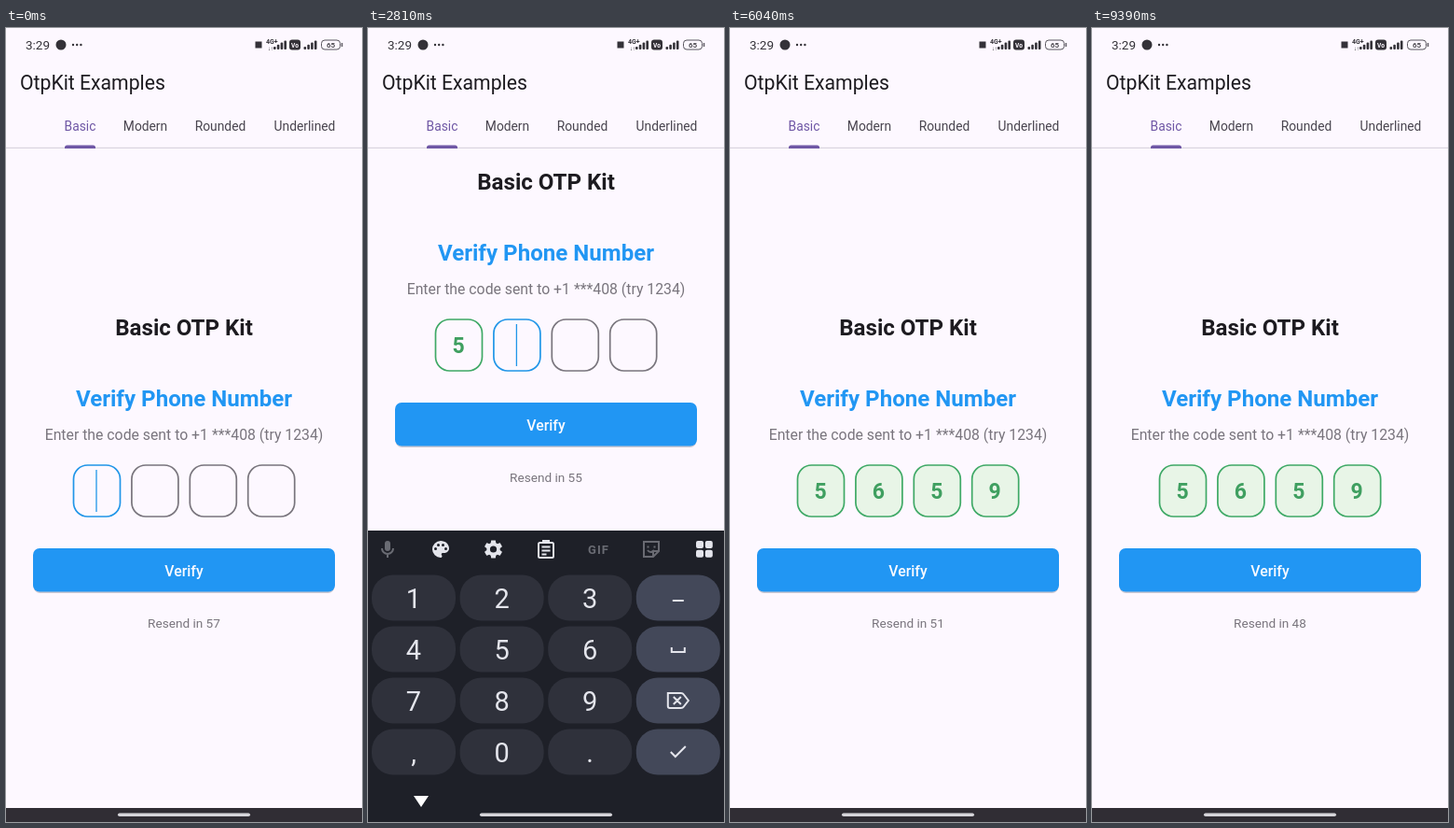
An HTML page for the animation above (9.43 s loop, 382 by 850 pixels).

```html
<!DOCTYPE html>
<html lang="en">
<head>
<meta charset="utf-8">
<title>OTP demo</title>
<style>
html, body { margin: 0; width: 100%; height: 100%; overflow: hidden; background: #fdf8ff; }
svg { display: block; width: 382px; height: 850px; font-family: Roboto, "Noto Sans", sans-serif; }
.mid { text-anchor: middle; }
.line { fill: none; stroke: #e4e5ec; stroke-width: 2; }
.tab { font-size: 13.8px; fill: #49454f; }
.head { font-size: 24.1px; font-weight: 600; }
.digit { font-size: 23px; font-weight: 600; }
.key { font-size: 29px; fill: #e4e5ec; }
.dim { opacity: .38; }
</style>
</head>
<body>
<svg viewBox="0 0 382 850">
  <rect width="382" height="850" fill="#fdf8ff"/>

  <g id="content" class="mid">
    <text class="head" x="191" y="329" fill="#1d1b20">Basic OTP Kit</text>
    <text class="head" x="191" y="405" fill="#2196f3">Verify Phone Number</text>
    <text x="191" y="440.5" font-size="15.8" fill="#79757d">Enter the code sent to +1 ***408 (try 1234)</text>
    <g id="boxes"></g>
    <rect x="29.5" y="559" width="323" height="46" rx="7" fill="#cdc9d2"/>
    <rect x="29" y="557" width="324" height="46.5" rx="7" fill="#2196f3"/>
    <text x="191" y="586.5" font-size="15.8" font-weight="500" fill="#fafaff">Verify</text>
    <text id="resend" x="191" y="642" font-size="13.6" fill="#79757d"></text>
  </g>

  <g id="header">
    <rect width="382" height="128" fill="#fdf8ff"/>
    <text x="15" y="66" font-size="21.2" fill="#1d1b20">OtpKit Examples</text>
    <path d="M0 128.3H382" stroke="#d3ced8"/>
    <path d="M63 129v-1q0-2.5 2.5-2.5h28q2.5 0 2.5 2.5v1z" fill="#6f57a5"/>
    <g id="tabs" class="mid"></g>
    <g fill="#343238">
      <text x="21" y="22.5" font-size="13.5">3:29</text>
      <circle cx="59" cy="18" r="5.5"/>
      <g id="dots"></g>
      <rect x="267.5" y="14.5" width="7" height="7"/>
      <text id="net" x="279" y="17" font-size="7" font-weight="700"></text>
      <text x="281" y="24" font-size="6">↓↑</text>
      <g id="bars"></g>
      <rect x="304" y="12.5" width="12" height="11" rx="3"/>
      <text x="310" y="20.5" font-size="6.5" font-weight="700" class="mid" fill="#fdf8ff">Vo</text>
      <rect x="338.5" y="13" width="20" height="10" rx="3.5" fill="none" stroke="#59565e"/>
      <path d="M360.5 16v4" stroke="#59565e" stroke-width="1.5"/>
      <text x="348.5" y="21" font-size="8" font-weight="500" class="mid">65</text>
    </g>
  </g>

  <g id="board">
    <rect id="panel" width="382" height="312"/>
    <g id="keys" class="mid"></g>
    <g id="mic" class="dim" transform="translate(21 20)">
      <rect x="-3" y="-9" width="6" height="11" rx="3" fill="#e4e5ec"/>
      <path class="line" d="M-6-1a6 6 0 0 0 12 0M0 5v4"/>
    </g>
    <g id="tools">
      <g transform="translate(66 8)">
        <path fill="#e4e5ec" d="M12 3a9 9 0 0 0 0 18c.83 0 1.5-.67 1.5-1.5 0-.39-.15-.74-.39-1.01-.23-.26-.38-.61-.38-.99 0-.83.67-1.5 1.5-1.5H16c2.76 0 5-2.24 5-5 0-4.42-4.03-8-9-8z"/>
        <path d="M6.5 11.5h0M9.5 7.5h0M14.5 7.5h0M17.5 11.5h0" stroke="#1e2028" stroke-width="3" stroke-linecap="round"/>
      </g>
      <path transform="translate(122.5 8)" fill="#e4e5ec" d="M19.14 12.94c.04-.3.06-.61.06-.94 0-.32-.02-.64-.07-.94l2.03-1.58c.18-.14.23-.41.12-.61l-1.92-3.32c-.12-.22-.37-.29-.59-.22l-2.39.96c-.5-.38-1.03-.7-1.62-.94l-.36-2.54c-.04-.24-.24-.41-.48-.41h-3.84c-.24 0-.43.17-.47.41l-.36 2.54c-.59.24-1.13.57-1.62.94l-2.39-.96c-.22-.08-.47 0-.59.22L2.74 8.87c-.12.21-.08.47.12.61l2.03 1.58c-.05.3-.09.63-.09.94s.02.64.07.94l-2.03 1.58c-.18.14-.23.41-.12.61l1.92 3.32c.12.22.37.29.59.22l2.39-.96c.5.38 1.03.7 1.62.94l.36 2.54c.05.24.24.41.48.41h3.84c.24 0 .44-.17.47-.41l.36-2.54c.59-.24 1.13-.56 1.62-.94l2.39.96c.22.08.47 0 .59-.22l1.92-3.32c.12-.22.07-.47-.12-.61zM12 15.6a3.6 3.6 0 1 1 0-7.2 3.6 3.6 0 0 1 0 7.2z"/>
      <g class="line" transform="translate(191 20)">
        <rect x="-8" y="-7" width="16" height="16" rx="1.5"/>
        <path d="M-3-7V-9H3V-7M-4.5-2.5h9M-4.5 1.5h9M-4.5 5.5h5"/>
      </g>
      <text class="mid dim" x="247.5" y="24.5" font-size="13" font-weight="700" letter-spacing="1" fill="#e4e5ec">GIF</text>
      <g class="line dim" transform="translate(304 20)">
        <path d="M8 2V-8H-8V8H2zH2V8M-4 1q3 4 7 0M-3.5-3.5v2M3.5-3.5v2"/>
      </g>
    </g>
    <g id="grid" fill="#e4e5ec"></g>
  </g>

  <path id="hide" d="M49 822h16l-8 12z" fill="#fff"/>
  <rect x="120" y="840.5" width="142" height="3.6" rx="1.8" fill="#d6d5da"/>
</svg>

<script>
const LOOP = 9430, OPEN = 463, CLOSE = 5135, BLUR = 5450;
const CLOSED_Y = 835, OPEN_Y = 538;
const CODE = "5659", TYPED = [2450, 3450, 4550, 4950];
const BLUE = "#2196e8", GREEN = "#3fa966", GREY = "#79757d";

const $ = id => document.getElementById(id);
const clamp = u => Math.min(1, Math.max(0, u));
const easeOut = u => 1 - (1 - clamp(u)) ** 3;
const show = (visible, ...ids) => ids.forEach(id => $(id).style.display = visible ? "" : "none");

function add(parent, tag, attrs, text = "") {
  const el = document.createElementNS("http://www.w3.org/2000/svg", tag);
  for (const k in attrs) el.setAttribute(k, attrs[k]);
  el.textContent = text;
  return $(parent).appendChild(el);
}

[["Basic", 79.5], ["Modern", 149.5], ["Rounded", 230], ["Underlined", 320.5]].forEach(([name, x], i) =>
  add("tabs", "text", { class: "tab", x, y: 110, style: i ? "" : "fill:#6f57a5" }, name));

for (let i = 0; i < 3; i++) add("dots", "circle", { cx: 72 + i * 4.2, cy: 18, r: 1.2 });
for (const x of [287, 319.5])
  for (let i = 0; i < 4; i++)
    add("bars", "rect", { x: x + i * 3.8, y: 20 - i * 2.2, width: 2.6, height: 3 + i * 2.2, rx: 1 });

for (let i = 0; i < 4; i++)
  add("grid", "rect", { x: 352 + i % 2 * 9.8, y: 11 + (i >> 1) * 9.8, width: 8, height: 8, rx: 2 });

const actions = [
  "M-6 3H6",
  "M-7-2V3H7V-2",
  "M-11-8H3Q5-8 6-6.5L11 0 6 6.5Q5 8 3 8H-9Q-11 8-11 6V-8zM-5-4L3 4M3-4L-5 4",
  "M-8 0L-3 5 8-6"
];
["123", "456", "789", ",0."].forEach((row, r) => {
  const y = 72 + r * 55;
  for (let c = 0; c < 4; c++) {
    const x = 49 + c * 94.6;
    add("keys", "rect", { x: x - 45, y: y - 24.5, width: 90, height: 49, rx: 23, fill: c < 3 ? "#2f313b" : "#434859" });
    if (c < 3) add("keys", "text", { class: "key", x, y: y + 10.5 }, row[c]);
    else add("keys", "path", { class: "line", d: actions[r], transform: `translate(${x} ${y})` });
  }
});

const boxes = [...CODE].map((_, i) => {
  const x = 72.5 + i * 62.4;
  return {
    frame: add("boxes", "rect", { x, y: 468, width: 50, height: 55, rx: 15, "stroke-width": 1.7 }),
    digit: add("boxes", "text", { class: "digit", x: x + 24.5, y: 503.5 }),
    caret: add("boxes", "path", { d: `M${x + 24.5} 473V518`, stroke: BLUE, "stroke-width": 1.3 })
  };
});

function draw(t) {
  const shown = easeOut((t - OPEN) / 480) - easeOut((t - CLOSE) / 450);
  const top = CLOSED_Y - (CLOSED_Y - OPEN_Y) * shown;
  const shift = (CLOSED_Y - top) / 2 + Math.max(0, 665 - top) * .059;
  $("content").setAttribute("transform", `translate(0 ${-shift})`);
  $("board").setAttribute("transform", `translate(0 ${top})`);

  const open = shown > .001;
  show(open, "keys", "grid", "mic");
  show(open && t < CLOSE, "tools", "hide");
  $("panel").setAttribute("fill", open ? "#1e2028" : "#302d34");

  $("resend").textContent = "Resend in " + (57 - Math.floor((t + 100) / 1000));
  $("net").textContent = t > 6900 && t < 8100 ? "4G" : "4G+";

  const count = TYPED.filter(time => t >= time).length;
  const focus = t < BLUR ? Math.min(count, 3) : -1;
  const sinceInput = count ? t - TYPED[count - 1] : t + 200;
  const pale = clamp((t - BLUR) / 200);
  const fill = count < 4 ? "#fdf8ff"
    : `rgb(${217 + 15 * pale},${243 + 2 * pale},${214 + 17 * pale})`;

  boxes.forEach(({ frame, digit, caret }, i) => {
    frame.setAttribute("fill", fill);
    frame.setAttribute("stroke", i === focus ? BLUE : i < count ? GREEN : GREY);
    digit.textContent = i < count ? CODE[i] : "";
    digit.setAttribute("fill", i === focus ? "#1d1b20" : "#3f9f60");
    caret.style.display = i === focus && count < 4 && sinceInput % 1000 < 500 ? "" : "none";
  });
}

const start = performance.now();
function tick() {
  draw((performance.now() - start) % LOOP);
  requestAnimationFrame(tick);
}
tick();
</script>
</body>
</html>
```
